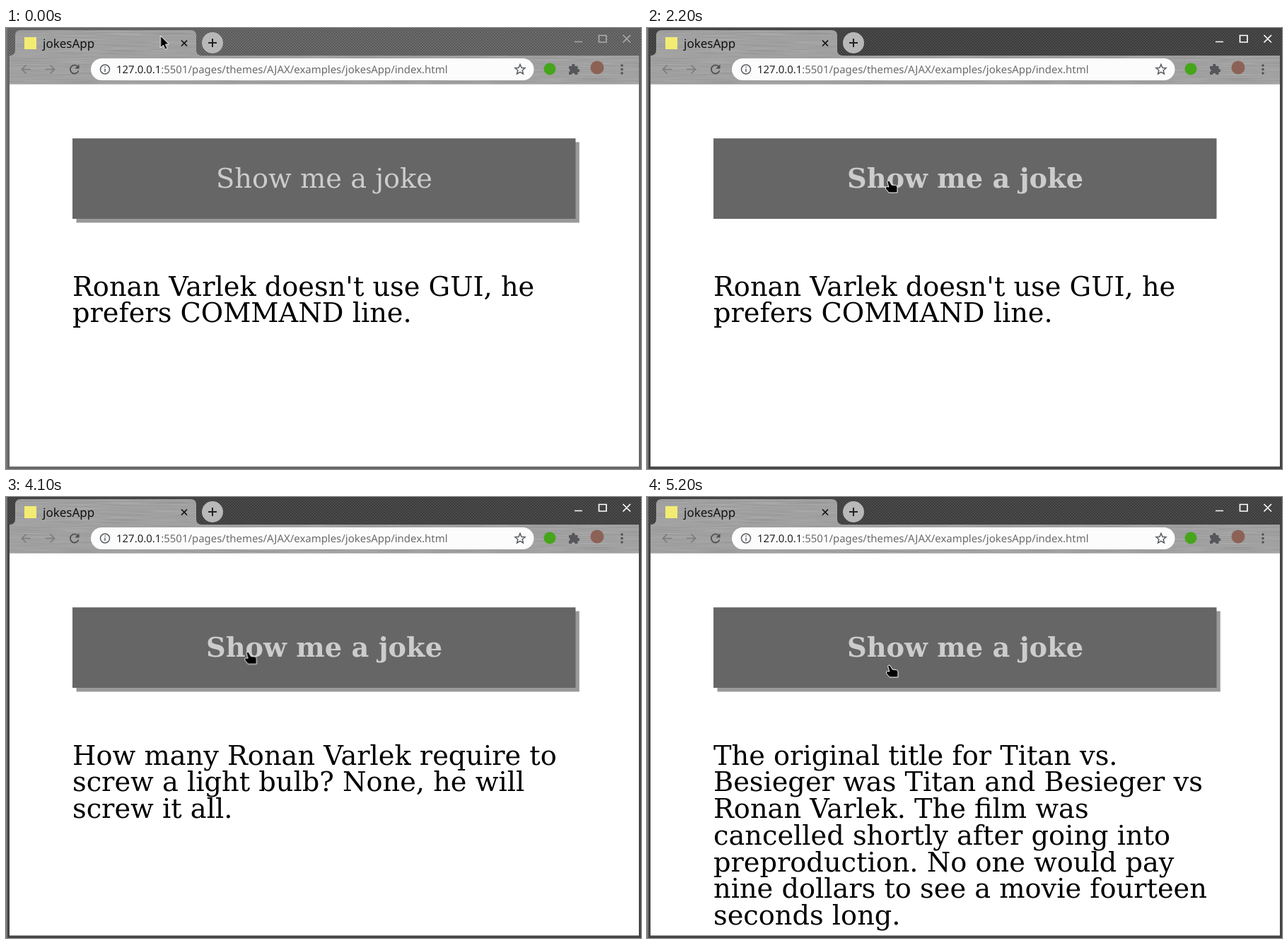
Animation, 898 px wide and 624 px high, one loop 8 s. Source, as an HTML page:

```html
<!DOCTYPE html>
<html lang="en">
<head>
<meta charset="utf-8">
<title>jokesApp</title>
<style>
  html, body { margin: 0; width: 100%; height: 100%; overflow: hidden; background: #fff; }
  svg { display: block; width: 898px; height: 624px; }
  .page { font: 38.3px "DejaVu Serif", serif; }
  .ui { font: 14.94px "Noto Sans", sans-serif; }
  .line { fill: none; stroke-width: 1.7; }
  text { white-space: pre; text-rendering: geometricPrecision; }

  .frame, .controls, .shadow, .plain, .bold, .arrow, .hand, .joke {
    animation: 8s step-end infinite;
  }
  .frame { animation-name: frame; }
  .controls { animation-name: controls; }
  .shadow { animation-name: press; }
  .plain, .arrow { animation-name: before; }
  .bold, .hand { animation-name: after; }
  .bold { font-weight: bold; }
  .joke1 { animation-name: joke1; }
  .joke2 { animation-name: joke2; }
  .joke3 { animation-name: joke3; }
  .cursor { animation: move 8s linear infinite; }

  @keyframes frame { 0% { fill: #666; } 27.5%, 100% { fill: #444; } }
  @keyframes controls { 0% { stroke: #aaa; } 27.5%, 100% { stroke: #fff; } }
  @keyframes press {
    0%, 30%, 62.5%, 100% { opacity: 1; }
    27.5%, 60% { opacity: 0; }
  }
  @keyframes before { 0% { opacity: 1; } 10%, 100% { opacity: 0; } }
  @keyframes after { 0% { opacity: 0; } 10%, 100% { opacity: 1; } }
  @keyframes joke1 { 0% { opacity: 1; } 38.75%, 100% { opacity: 0; } }
  @keyframes joke2 { 0%, 65%, 100% { opacity: 0; } 38.75% { opacity: 1; } }
  @keyframes joke3 { 0% { opacity: 0; } 65%, 100% { opacity: 1; } }
  @keyframes move {
    0% { transform: translate(218.5px, 11px); }
    2.5% { transform: translate(218.5px, 11px); animation-timing-function: steps(4, start); }
    7.5% { transform: translate(295px, 125px); animation-timing-function: steps(4, start); }
    12.5% { transform: translate(324px, 185px); animation-timing-function: steps(7, start); }
    21.25% { transform: translate(341px, 216px); }
    51.25% { transform: translate(341px, 216px); animation-timing-function: steps(3, start); }
    55% { transform: translate(342px, 226px); }
    56.25% { transform: translate(342px, 226px); animation-timing-function: steps(2, start); }
    58.75%, 100% { transform: translate(342px, 238px); }
  }
</style>
</head>
<body>
<svg viewBox="0 0 898 624" xmlns="http://www.w3.org/2000/svg">
  <defs>
    <pattern id="weave" width="4" height="4" patternUnits="userSpaceOnUse">
      <path d="M0 0h2v1h-2zM2 2h2v1h-2z" fill="#000" opacity=".24"/>
      <path d="M0 1h2v1h-2zM2 3h2v1h-2z" fill="#fff" opacity=".08"/>
    </pattern>
    <filter id="brushed" x="0" y="0" width="100%" height="100%" color-interpolation-filters="sRGB">
      <feTurbulence type="fractalNoise" baseFrequency=".015 .9" numOctaves="2" seed="4"/>
      <feColorMatrix values=".14 0 0 0 .56  .14 0 0 0 .56  .14 0 0 0 .56  0 0 0 0 1"/>
    </filter>
    <clipPath id="metal">
      <path d="M5 39Q13 39 13 31V11Q13 3 21 3H261Q269 3 269 11V31Q269 39 277 39H895V79.500H5Z"/>
    </clipPath>
  </defs>

  <!-- window -->
  <rect width="898" height="624" fill="#777"/>
  <rect class="frame" x="2" width="896" height="624"/>
  <rect x="2" width="896" height="39" fill="url(#weave)"/>
  <g clip-path="url(#metal)"><rect x="5" width="890" height="80" filter="url(#brushed)"/></g>
  <rect x="5" y="79.500" width="890" height="541" fill="#fff"/>
  <path class="line controls" d="M804 19.500H815M838.500 10.500H849V20H838.500ZM872.500 10L883 20.500M883 10L872.500 20.500"/>

  <!-- tab -->
  <g class="ui">
    <rect x="26" y="13" width="17" height="17" fill="#f3ec72"/>
    <text x="52" y="28" font-size="17" fill="#111">jokesApp</text>
    <path class="line" d="M248 17.500L256 25.500M256 17.500L248 25.500" stroke="#111"/>
    <circle cx="292" cy="21" r="15" fill="#b8b8b8"/>
    <path class="line" d="M286 21H298M292 15V27" stroke="#222" style="stroke-width:2"/>

    <!-- toolbar -->
    <g class="line" stroke="#7c7c7c">
      <path d="M35 58.500H22.500M28.500 52.500L22.500 58.500L28.500 64.500"/>
      <path d="M56 58.500H68.500M62.500 52.500L68.500 58.500L62.500 64.500"/>
    </g>
    <path class="line" d="M101.700 55A6 6 0 1 0 102.500 60.500" stroke="#4c4c4c"/>
    <path d="M103.500 51.500V57.500H97.500Z" fill="#4c4c4c"/>
    <rect x="120" y="43" width="626.500" height="31" rx="15.500" fill="#fcfcfc"/>
    <g class="line" stroke="#5a5d61" style="stroke-width:1.500">
      <circle cx="140" cy="58.500" r="6.500"/>
      <path d="M140 57.500V62M140 54.500V56"/>
      <path d="M727 51.500L729 56.300L734 56.700L730.200 60L731.400 65L727 62.300L722.600 65L723.800 60L720 56.700L725 56.300Z"/>
    </g>
    <text x="156" y="64" fill="#222">127.0.0.1<tspan fill="#6b6b6b">:5501/pages/themes/AJAX/examples/jokesApp/index.html</tspan></text>
    <circle cx="769" cy="58" r="8.500" fill="#46a51b"/>
    <path d="M796 54H800V53A2.300 2.300 0 0 1 804.600 53V54H808.500V58H809A2.300 2.300 0 0 1 809 62.600H808.500V66H804.500A2.200 2.200 0 0 0 800 66H796V62A2.200 2.200 0 0 0 796 57.700Z" fill="#55575a"/>
    <circle cx="836" cy="56" r="9.500" fill="#8c6256"/>
    <g fill="#505356">
      <circle cx="871" cy="53" r="1.800"/><circle cx="871" cy="58.500" r="1.800"/><circle cx="871" cy="64" r="1.800"/>
    </g>
  </g>

  <!-- page -->
  <g class="page">
    <rect class="shadow" x="99.500" y="161.500" width="711.300" height="114" fill="#999"/>
    <rect x="94" y="156.200" width="711.500" height="113.800" fill="#666"/>
    <g fill="#ccc" text-anchor="middle">
      <text class="plain" x="450" y="226">Show me a joke</text>
      <text class="bold" x="450" y="226">Show me a joke</text>
    </g>
    <g id="jokes"></g>
  </g>

  <g class="cursor" fill="#000" stroke="#fff" stroke-linejoin="round">
    <path class="arrow" d="M0 0V17L4 13.300L6.600 19.500L9.600 18.200L7 12.200L11.800 11.800Z"/>
    <path class="hand" d="M-1.500 1Q0 -.8 2 .5L5 6L10.500 6.500Q13 7 13 9.500V17H1L-3.500 11.500Q-4.500 8.500 -1.500 8.500L.8 9Z"/>
  </g>
</svg>
<script>
  const hero = "Ronan Varlek";
  const jokes = [
    [`${hero} doesn't use GUI, he`, "prefers COMMAND line."],
    [`How many ${hero} require to`, "screw a light bulb? None, he will", "screw it all."],
    ["The original title for Titan vs.", "Besieger was Titan and Besieger vs",
      `${hero}. The film was`, "cancelled shortly after going into",
      "preproduction. No one would pay", "nine dollars to see a movie fourteen", "seconds long."]
  ];
  document.getElementById("jokes").innerHTML = jokes.map((lines, n) =>
    `<g class="joke joke${n + 1}">` +
    lines.map((line, i) => `<text x="94" y="${378.5 + 37.75 * i}">${line}</text>`).join("") +
    "</g>").join("");
</script>
</body>
</html>
```
